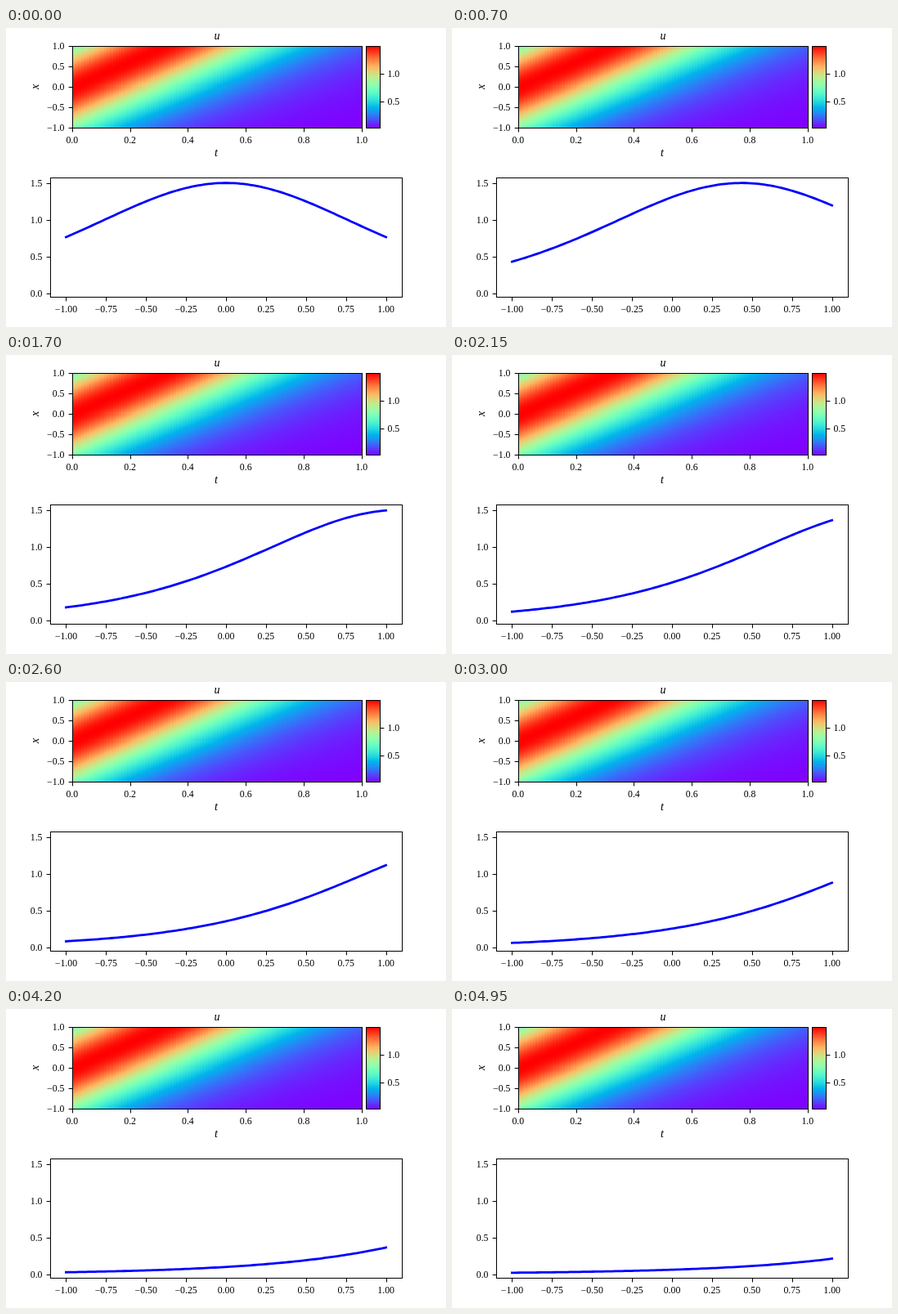
Animation of 538x366 px, one loop 5000 ms. Source, as an HTML page with a canvas:

```html
<!DOCTYPE html>
<html>
<head>
<meta charset="utf-8">
<style>
html, body { margin: 0; width: 538px; height: 366px; overflow: hidden; background: #fff; }
canvas { display: block; }
</style>
</head>
<body>
<canvas id="stage" width="538" height="366"></canvas>
<script>
const ctx = document.getElementById('stage').getContext('2d');
const FRAMES = 100, STEP = 50, CELLS = 100;
const U_MIN = 0.025, U_MAX = 1.5;

// Travelling pulse whose tail flattens slightly with time.
function wave(x, t) {
  const phase = t * (2.64 + 0.119 * t - 0.516 * t * t)
    - x * (0.866 - 0.312 * t * t) - 0.064 * x * x * t ** 3;
  return U_MAX / Math.cosh(phase) ** 2;
}

function rainbow(v) {
  const channels = [Math.abs(2 * v - 0.5), Math.sin(Math.PI * v), Math.cos(Math.PI * v / 2)];
  return `rgb(${channels.map(c => Math.round(255 * Math.min(1, Math.max(0, c))))})`;
}

function label(text, x, y, align, font = '11.8px') {
  ctx.font = font + ' "Liberation Serif", serif';
  ctx.textAlign = align;
  ctx.fillText(text, x, y);
}

const format = (v, digits) => v.toFixed(digits).replace('-', '\u2212');

function line(x1, y1, x2, y2) {
  ctx.beginPath();
  ctx.moveTo(x1, y1);
  ctx.lineTo(x2, y2);
  ctx.stroke();
}

function tickX(x, y, text) {
  const px = Math.round(x) + 0.5;
  line(px, y + 0.5, px, y + 5.4);
  label(text, x, y + 19, 'center');
}

function tickLeft(x, y, text) {
  const py = Math.round(y) + 0.5;
  line(x + 0.5, py, x - 4.4, py);
  label(text, x - 9.5, y + 4, 'right');
}

function frame(x1, y1, x2, y2) {
  ctx.strokeRect(x1 + 0.5, y1 + 0.5, x2 - x1, y2 - y1);
}

function drawHeatmap() {
  const map = document.createElement('canvas');
  map.width = map.height = CELLS;
  const cells = map.getContext('2d');
  for (let i = 0; i < CELLS; i++) {
    for (let j = 0; j < CELLS; j++) {
      const u = wave(1 - 2 * j / (CELLS - 1), i / (CELLS - 1));
      cells.fillStyle = rainbow((u - U_MIN) / (U_MAX - U_MIN));
      cells.fillRect(i, j, 1, 1);
    }
  }
  ctx.imageSmoothingEnabled = false;
  ctx.drawImage(map, 81, 22, 354, 101);
}

function drawColorbar() {
  for (let y = 0; y <= 100; y++) {
    ctx.fillStyle = rainbow(1 - y / 100);
    ctx.fillRect(440, 22 + y, 18, 1);
  }
}

function drawPlot() {
  ctx.fillStyle = '#fff';
  ctx.fillRect(0, 0, 538, 366);
  drawHeatmap();
  drawColorbar();

  ctx.fillStyle = ctx.strokeStyle = '#000';
  ctx.lineWidth = 1;
  frame(81, 22, 435, 122);
  frame(440, 22, 457, 122);
  frame(54, 183, 484, 329);

  for (let i = 0; i <= 5; i++) tickX(80.8 + 70.8 * i, 122, format(i / 5, 1));
  for (let i = -2; i <= 2; i++) tickLeft(81, 72.2 - 25 * i, format(i / 2, 1));
  for (let i = -4; i <= 4; i++) tickX(269 + 48.9 * i, 329, format(i / 4, 2));
  for (let i = 0; i <= 3; i++) tickLeft(54, 325 - 45.1 * i, format(i / 2, 1));
  for (const [y, text] of [[56, '1.0'], [90, '0.5']]) {
    line(457.5, y + 0.5, 462.4, y + 0.5);
    label(text, 466.5, y + 4, 'left');
  }

  label('u', 258, 14, 'center', 'italic 14px');
  label('t', 257, 157, 'center', 'italic 14px');
  ctx.save();
  ctx.translate(40, 72);
  ctx.rotate(-Math.PI / 2);
  label('x', 0, 0, 'center', 'italic 14px');
  ctx.restore();
}

function drawCurve(t) {
  ctx.fillStyle = '#fff';
  ctx.fillRect(55, 184, 429, 145);
  ctx.strokeStyle = '#00f';
  ctx.lineWidth = 2.78;
  ctx.lineCap = 'square';
  ctx.lineJoin = 'round';
  ctx.beginPath();
  for (let i = 0; i < CELLS; i++) {
    const x = 2 * i / (CELLS - 1) - 1;
    ctx.lineTo(269 + 195.6 * x, 325.1 - 90.25 * wave(x, t));
  }
  ctx.stroke();
}

function animate() {
  const index = Math.floor(performance.now() / STEP) % FRAMES;
  drawCurve(index / (FRAMES - 1));
  requestAnimationFrame(animate);
}

drawPlot();
animate();
</script>
</body>
</html>
```
